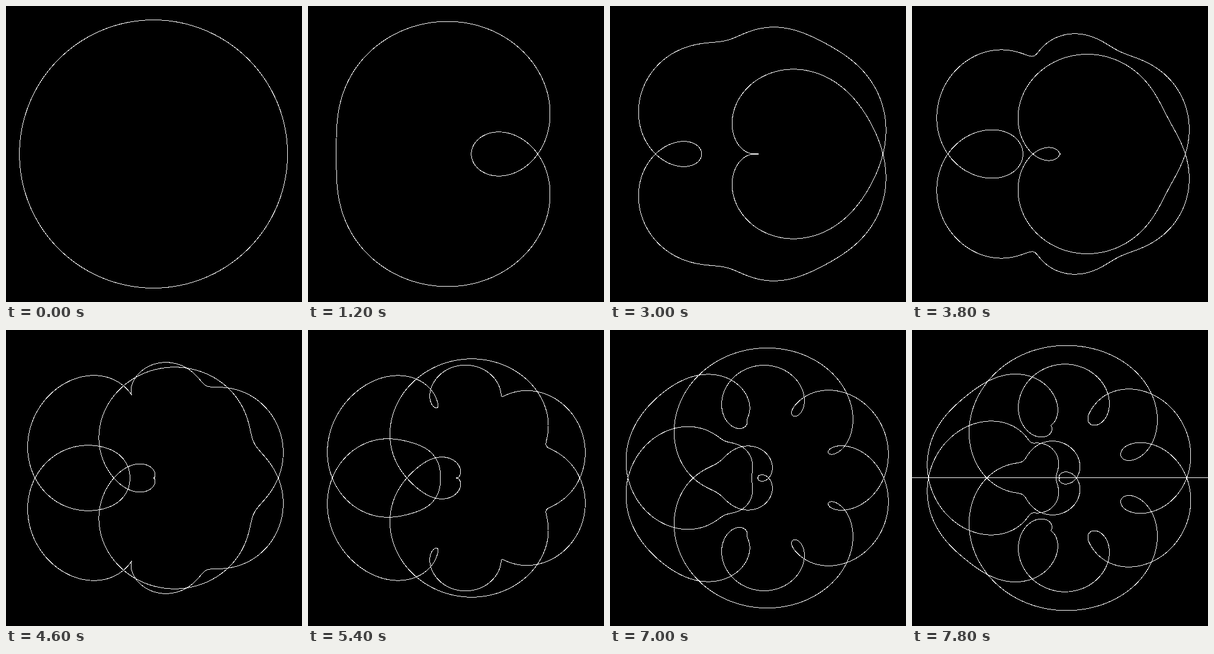
Recreate the animation shown at these times as an HTML page. Size 500 px wide and 500 px high, loop 8000 ms.

```html
<!DOCTYPE html>
<html lang="en">
<head>
<meta charset="utf-8">
<title>Eta product on shrinking horocycles</title>
<style>
  html, body { margin: 0; width: 100%; height: 100%; overflow: hidden; background: #000; }
  svg { display: block; width: 100%; height: 100%; background: #000; }
  path { fill: none; stroke: #fff; stroke-width: 1; shape-rendering: crispEdges; }
</style>
</head>
<body>
<svg viewBox="0 0 500 500">
  <path id="curve"/>
  <path id="axis" d="M0 249.5H500"/>
</svg>
<script>
// The curve is q * phi(q)^2 * phi(q^11)^2 on the circle q = exp(2 pi i (x + i y)),
// with y = 1, 1/2, 1/3, ... and scaled so that its farthest point touches the rim.
const LOOP = 8000, STEP = 200, CENTER = 250, RIM = 250 / 1.1;
const SAMPLES = 3000, TERMS = 10, LEVEL = 11;
const AXIS_STEPS = [30, 39];

const mul = ([a, b], [c, d]) => [a * c - b * d, a * d + b * c];

// Euler's product (1 - q)(1 - q^2)... by the pentagonal number series.
function phi(logR, angle) {
  let re = 0, im = 0;
  for (let m = -TERMS; m <= TERMS; m++) {
    const e = m * (3 * m - 1) / 2;
    const size = (m % 2 ? -1 : 1) * Math.exp(e * logR);
    re += size * Math.cos(e * angle);
    im += size * Math.sin(e * angle);
  }
  return [re, im];
}

function form(logR, angle) {
  const root = mul(phi(logR, angle), phi(LEVEL * logR, LEVEL * angle));
  return mul([Math.cos(angle), Math.sin(angle)], mul(root, root));
}

const curve = document.getElementById('curve');
const axis = document.getElementById('axis');
let shown = -1;

function draw(step) {
  if (step === shown) return;
  shown = step;
  const logR = -2 * Math.PI / (step + 1);
  const points = Array.from({ length: SAMPLES },
    (_, k) => form(logR, 2 * Math.PI * k / SAMPLES));
  const scale = RIM / Math.max(...points.map(([x, y]) => Math.hypot(x, y)));
  curve.setAttribute('d', 'M' + points
    .map(([x, y]) => (CENTER + scale * x).toFixed(2) + ' ' + (CENTER - scale * y).toFixed(2))
    .join('L') + 'Z');
  axis.style.display = AXIS_STEPS.includes(step) ? '' : 'none';
}

const start = performance.now();
function tick() {
  draw(Math.floor((performance.now() - start) % LOOP / STEP));
  requestAnimationFrame(tick);
}
tick();
</script>
</body>
</html>
```
